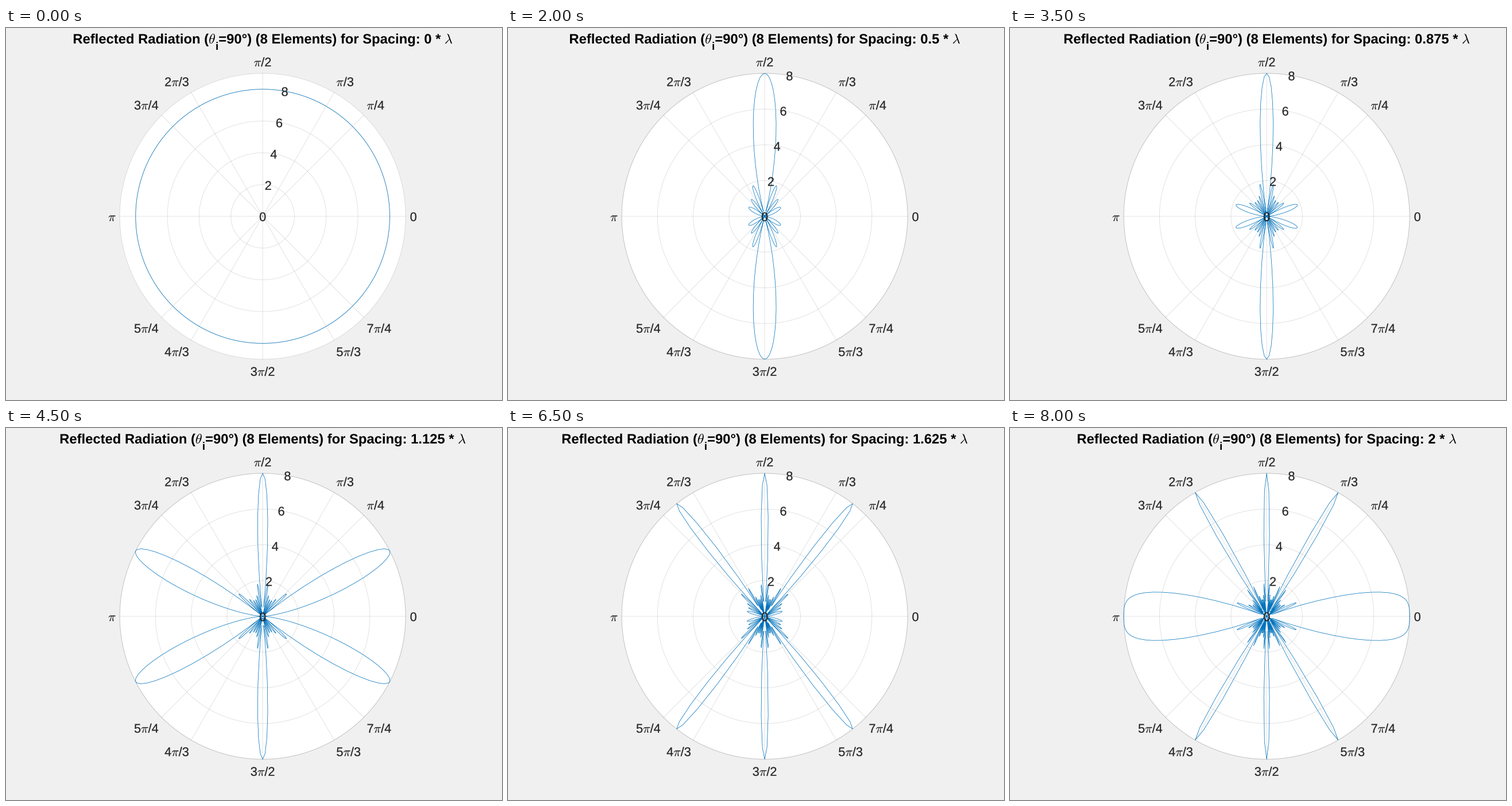
Animation of 864x648 px, one loop 8250 ms. Source, as a matplotlib script:

```python
import matplotlib.pyplot as plt
import numpy as np
from matplotlib.animation import FuncAnimation
from matplotlib.patches import Circle, PathPatch
from matplotlib.path import Path
from matplotlib.textpath import TextPath
from matplotlib.transforms import Affine2D

W, H = 864, 648
CX, CY, R = 447.12, 328.0, 249.0
TICK, TITLE = 21.8, 23.8
INK = "#262626"
GRID = dict(lw=0.85, alpha=0.15, zorder=2)
ELEMENTS = 8
FRAMES = 33
SPOKES = {
    0: "0", 45: "π/4", 60: "π/3", 90: "π/2", 120: "2π/3", 135: "3π/4",
    180: "π", 225: "5π/4", 240: "4π/3", 270: "3π/2", 300: "5π/3", 315: "7π/4",
}
# Greek letters: mathtext source and advance in em
GREEK = {"π": (r"$\pi$", 0.57), "θ": (r"$\theta$", 0.50), "λ": (r"$\lambda$", 0.583)}

plt.rcParams["mathtext.fontset"] = "cm"


def glyphs(s, size, weight):
    return TextPath((0, 0), s, size=size,
                    prop=dict(family="Liberation Sans", weight=weight))


def advance(s, size, weight):
    bar = glyphs("|", size, weight).get_extents().xmax
    return glyphs(s + "|", size, weight).get_extents().xmax - bar


def split_greek(s):
    runs = [""]
    for c in s:
        if c in GREEK:
            runs += [c, ""]
        else:
            runs[-1] += c
    return [r for r in runs if r]


def layout(runs, x, base, align, weight="normal"):
    """Join (text, size, drop) runs on one baseline; align is 0, 0.5 or 1."""
    parts, pen = [], 0.0
    for s, size, drop in runs:
        if s in GREEK:
            tex, em = GREEK[s]
            path, step = glyphs(tex, size, weight), em * size
        else:
            path, step = glyphs(s, size, weight), advance(s, size, weight)
        parts.append(path.transformed(Affine2D().scale(1, -1).translate(pen, drop)))
        pen += step
    joined = Path.make_compound_path(*parts)
    return joined.transformed(Affine2D().translate(x - align * pen, base))


def tick_path(s, x, mid, align=0.5):
    runs = [(r, TICK, 0) for r in split_greek(s)]
    return layout(runs, x, mid + 0.35 * TICK, align)


def title_path(spacing):
    tail = f"=90°) ({ELEMENTS} Elements) for Spacing: {spacing:g} * "
    runs = [("Reflected Radiation (", TITLE, 0), ("θ", TITLE, 0),
            ("i", 0.8 * TITLE, 11), (tail, TITLE, 0), ("λ", TITLE, 0)]
    return layout(runs, CX, 27, 0.5, "bold")


def polar(r, theta):
    return CX + r * np.cos(theta), CY - r * np.sin(theta)


theta = np.radians(np.arange(361))


def pattern(spacing):
    phase = 2 * np.pi * spacing * np.cos(theta)
    return np.abs(sum(np.exp(1j * n * phase) for n in range(ELEMENTS)))


fig = plt.figure(figsize=(W / 72, H / 72), dpi=72, facecolor="#f0f0f0")
ax = fig.add_axes([0, 0, 1, 1])
ax.set(xlim=(0, W), ylim=(H, 0))
ax.axis("off")


def add_text(path, color=INK, stroke=0.25):
    return ax.add_patch(PathPatch(path, fc=color, ec=color, lw=stroke, zorder=5))


def add_ring(radius):
    return ax.add_patch(Circle((CX, CY), radius, fill=False, ec=INK, **GRID))


ax.add_patch(Circle((CX, CY), R, fc="white", lw=0, zorder=1))
add_ring(R)
for deg, name in SPOKES.items():
    a = np.radians(deg)
    x, y = polar(R, a)
    ax.plot([CX, x], [CY, y], color=INK, snap=False, **GRID)
    c, s = np.round([np.cos(a), np.sin(a)], 9)
    x, y = polar(256.5, a)
    add_text(tick_path(name, x, y + 0.7 - 13 * np.sign(s), (1 - np.sign(c)) / 2))

levels = (0, 2, 4, 6, 8)
rings = [add_ring(R * v / 8) for v in levels[1:]]
r_labels = [add_text(tick_path(str(v), CX, CY)) for v in levels]
curve, = ax.plot([], [], color="#0072bd", lw=0.75, snap=False, zorder=4)
title = add_text(title_path(0), "black", 0)


def update(k):
    spacing = k / 16
    limit = 8 if k else 9
    scale = R / limit
    curve.set_data(*polar(scale * pattern(spacing), theta))
    for ring, v in zip(rings, levels[1:]):
        ring.set_radius(scale * v)
    for label, v in zip(r_labels, levels):
        x, y = polar(scale * v, np.radians(80))
        label.set_path(tick_path(str(v), x, y + 0.7))
    title.set_path(title_path(spacing))
    return [curve, title, *rings, *r_labels]


anim = FuncAnimation(fig, update, frames=FRAMES, interval=250, repeat=True,
                     repeat_delay=0, blit=False)
plt.show()
```
